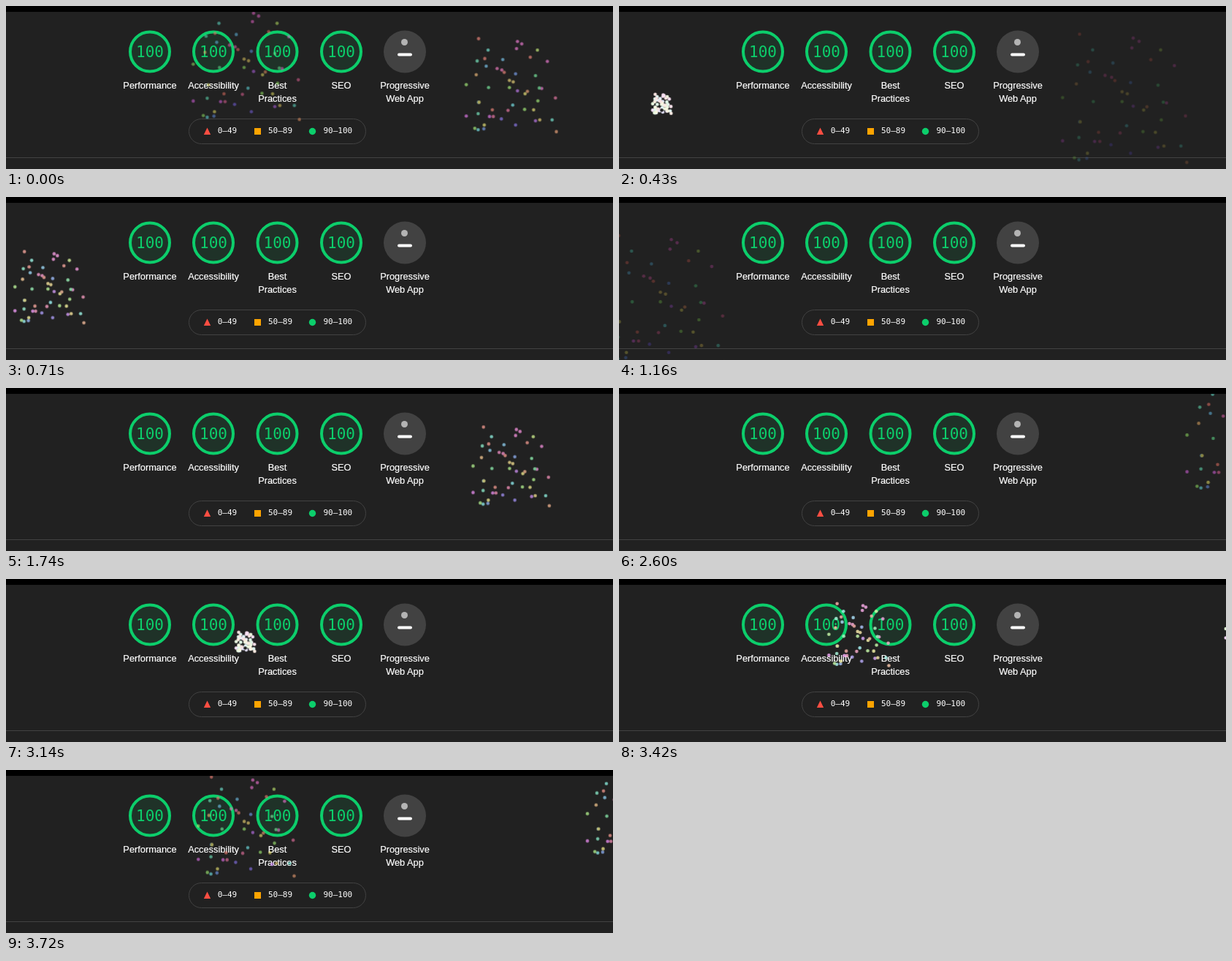
Animation of 831x223 px, one loop 3820 ms. Source, as an HTML page:

```html
<!DOCTYPE html>
<html lang="en">
<head>
<meta charset="utf-8">
<title>Score fireworks</title>
<style>
  html, body { margin: 0; width: 100%; height: 100%; overflow: hidden; background: #212121; }
  svg { position: absolute; left: 0; top: 0; display: block; }
  .sky { position: absolute; left: 0; top: 8px; width: 831px; height: 215px; overflow: hidden; }
  .burst { position: absolute; width: 0; height: 0; transform: scale(.92); transform-origin: 0 0; }
  .spark { position: absolute; left: -2.5px; top: -2.5px; width: 5px; height: 5px; border-radius: 50%; }
  .label { font: 12.8px "Liberation Sans", Arial, sans-serif; fill: #fff; stroke: #fff; stroke-width: .2; text-anchor: middle; }
  .score { font: 21px "DejaVu Sans Mono", monospace; fill: #0cce6b; text-anchor: middle; }
  .range { font: 11px "DejaVu Sans Mono", monospace; fill: #fff; }
</style>
</head>
<body>
<svg width="831" height="223" viewBox="0 0 831 223">
  <rect width="831" height="8"/>
  <rect y="207" width="831" height="1" fill="#424242"/>
  <g id="gauges"></g>
  <circle cx="546" cy="62.5" r="29" fill="#424242"/>
  <circle cx="545.5" cy="49.5" r="4.5" fill="#b4b4b4"/>
  <rect x="536" y="64.5" width="20" height="4" rx="2" fill="#fff"/>
  <rect x="250.5" y="154.5" width="242" height="34" rx="17" fill="none" stroke="#424242"/>
  <path d="M275.5 166.5l4.7 9.5h-9.4z" fill="#ff4e42"/>
  <rect x="340" y="167" width="9" height="9" fill="#ffa400"/>
  <circle cx="419.5" cy="171.5" r="4.7" fill="#0cce6b"/>
  <g class="range">
    <text x="289.7" y="174.3">0–49</text>
    <text x="359" y="174.3">50–89</text>
    <text x="434.4" y="174.3">90–100</text>
  </g>
</svg>
<div class="sky"></div>
<script>
const LOOP = 3820;
const STEPS = [0, 130, 280, 430, 580, 710, 860, 1010, 1160, 1290, 1440, 1590, 1740, 1870,
  2020, 2170, 2300, 2450, 2600, 2720, 2870, 3020, 3140, 3290, 3420, 3570, 3720];

// Score gauges
const GAUGES = [
  [197, 'Performance'], [284, 'Accessibility'], [371.5, 'Best', 'Practices'],
  [459, 'SEO'], [546, 'Progressive', 'Web App']
];
document.getElementById('gauges').innerHTML = GAUGES.map(([x, ...lines], i) => {
  const ring = i < 4
    ? `<circle cx="${x}" cy="62.5" r="27" fill="#1f3228" stroke="#0cce6b" stroke-width="4"/>
       <text class="score" x="${x}" y="69.5">100</text>`
    : '';
  return ring + lines.map((s, n) =>
    `<text class="label" x="${x}" y="${112.8 + 18 * n}">${s}</text>`).join('');
}).join('');

// Spark end points: hue, then x, y pairs
const SPARKS = [
  [6, 42, -124, -38, -13, -13, -92, -67, -163, -54, -121],
  [22, 36, -52, 97, 33],
  [33, -72, -87],
  [48, -2, -75, 62, 8, 6, -72],
  [57, -66, -29, 31, -47, -55, 19, 49, -13],
  [80, 57, -139],
  [98, 58, -32, -93, -66, 30, -14, -2, -60, -75, 26],
  [140, 53, -85, 61, -59, -46, -60],
  [159, -70, -116, -68, -5],
  [170, -47, -139, 88, 8],
  [182, 5, -23, -68, 29],
  [200, -51, -105, -16, -119, -67, -29],
  [220, -56, 27, 11, -89],
  [250, -19, 6, 11, 19],
  [277, 15, -53, 53, 10],
  [296, -93, 0, -44, 1],
  [314, 13, -142, 24, -152, 66, -58, 78, -115, 15, -157],
  [325, -28, -100, -18, -97],
  [336, -36, 1, -5, -12, 95, -38]
];
const spread = [];
for (const [hue, ...xy] of SPARKS)
  for (let i = 0; i < xy.length; i += 2)
    spread.push(`${xy[i]}px ${xy[i + 1] + .33}px hsl(${hue}, 80%, 60%)`);
const packed = spread.map(() => '0px 0px #fff').join();

// Launch places in percent: left, top
const PLACES = [[47, 4], [30, 7], [70, 6], [20, 3], [80, 3]];

function makeBurst(duration, phase) {
  const box = document.createElement('div');
  const spark = document.createElement('div');
  box.className = 'burst';
  spark.className = 'spark';
  box.append(spark);
  document.querySelector('.sky').append(box);

  const bang = spark.animate(
    { boxShadow: [packed, spread.join()] },
    { duration, easing: 'ease-out', fill: 'both' });
  const gravity = spark.animate(
    { transform: ['translateY(0px)', 'translateY(80px)'], opacity: [1, 0] },
    { duration, easing: 'ease-in', fill: 'both' });
  bang.pause();
  gravity.pause();

  return t => {
    const turn = t / duration + phase;
    const [left, top] = PLACES[Math.floor(turn) % PLACES.length];
    box.style.left = -416 + 15.8 * left + 'px';
    box.style.top = 22.2 + 15.8 * top + 'px';
    bang.currentTime = gravity.currentTime = turn % 1 * duration;
  };
}

const bursts = [makeBurst(983, .652), makeBurst(1222, 2.52)];
const start = performance.now();
let shown = -1;

function tick() {
  const t = (performance.now() - start) % LOOP;
  const step = STEPS.filter(s => s <= t).pop();
  if (step !== shown) {
    shown = step;
    bursts.forEach(draw => draw(step));
  }
  requestAnimationFrame(tick);
}
tick();
</script>
</body>
</html>
```
